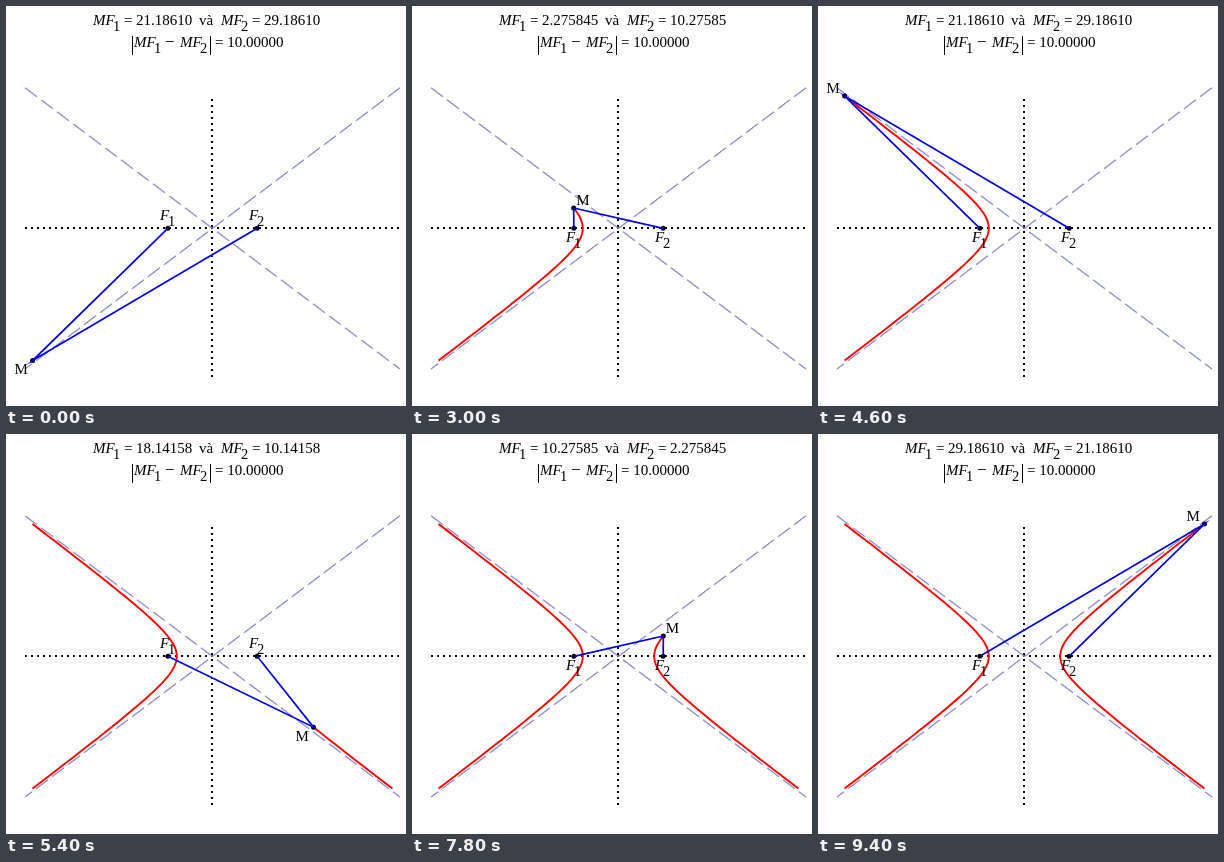
Recreate the animation shown at these times as an HTML page with a canvas. Size 400 px wide and 400 px high, loop 9.6 s.

```html
<!DOCTYPE html>
<html lang="vi">
<head>
<meta charset="utf-8">
<title>Hyperbola traced by its focal distances</title>
<style>
  html, body { margin: 0; width: 100%; height: 100%; overflow: hidden; background: #fff; }
  canvas { display: block; }
</style>
</head>
<body>
<canvas width="400" height="400"></canvas>
<script>
const ctx = document.querySelector('canvas').getContext('2d');
const CX = 206.5, CY = 222.3, UNIT = 8.93;
const A = 4, B = 3, C = 5;
const T_MAX = 2.3, T_STEP = 0.2, STEPS = 24, STEP_MS = 200;

const px = (x, y) => [CX + x * UNIT, CY - y * UNIT];
const onBranch = (side, t) => px(side * A * Math.cosh(t), B * Math.sinh(t));
const F1 = px(-C, 0), F2 = px(C, 0);

function line(points, color, width, dash = []) {
  ctx.strokeStyle = color;
  ctx.lineWidth = width;
  ctx.setLineDash(dash);
  ctx.beginPath();
  points.forEach(p => ctx.lineTo(...p));
  ctx.stroke();
}

function dot([x, y]) {
  ctx.beginPath();
  ctx.arc(x, y, 2.5, 0, 2 * Math.PI);
  ctx.fill();
}

function text(string, x, y, style = '', size = 15) {
  ctx.font = `${style} ${size}px "Liberation Serif", serif`;
  ctx.fillText(string, x, y);
}

function indexed(name, index, x, y) {
  text(name, x, y, 'italic');
  text(index, x + (name === 'MF' ? 20 : 8), y + 6, '', 14.5);
}

function trace(side, tEnd) {
  const points = [];
  for (let t = -T_MAX; t < tEnd; t += 0.05) points.push(onBranch(side, t));
  points.push(onBranch(side, tEnd));
  line(points, '#f00', 1.9);
}

function drawAxes() {
  line([[19, 222], [394, 222]], '#000', 2, [2, 4]);
  line([[206, 371], [206, 89]], '#000', 2, [2, 4]);
  for (const side of [1, -1]) {
    line([px(21 * side, 15.75), px(-21 * side, -15.75)], '#8c8cc6', 1.3, [15, 5]);
  }
}

function drawFormulas(side, t) {
  const base = A * 1.25 * Math.cosh(t);
  [base + side * A, base - side * A].forEach((distance, i) => {
    const x = 87 + 128 * i;
    indexed('MF', i + 1, x, 19);
    text('=', x + 31, 19);
    text(distance.toPrecision(7), x + 43, 19);
  });
  text('và', 193, 19);

  indexed('MF', 1, 128, 41);
  text('−', 159, 41, '', 17);
  indexed('MF', 2, 174, 41);
  text('= 10.00000', 209, 41);
  for (const x of [126.5, 204.5]) line([[x, 30], [x, 49]], '#000', 1);
}

function draw(now) {
  const step = Math.floor(now / STEP_MS) % (2 * STEPS);
  const side = step < STEPS ? -1 : 1;
  const t = -T_MAX + T_STEP * (step % STEPS);
  const M = onBranch(side, t);

  ctx.fillStyle = '#fff';
  ctx.fillRect(0, 0, 400, 400);
  ctx.fillStyle = '#000';

  drawAxes();
  if (side > 0) trace(-1, T_MAX);
  trace(side, t);
  [F1, F2, M].forEach(dot);
  line([F1, M, F2], '#0000dc', 1.7);

  drawFormulas(side, t);
  const focusLabelY = t < 0 ? 214 : 236;
  indexed('F', 1, 154, focusLabelY);
  indexed('F', 2, 243, focusLabelY);
  const labelDx = Math.abs(t) > 1.6 ? -18 : 2.5;
  text('M', M[0] + labelDx, M[1] + (t < 0 ? 13.5 : -3));

  requestAnimationFrame(draw);
}
requestAnimationFrame(draw);
</script>
</body>
</html>
```
